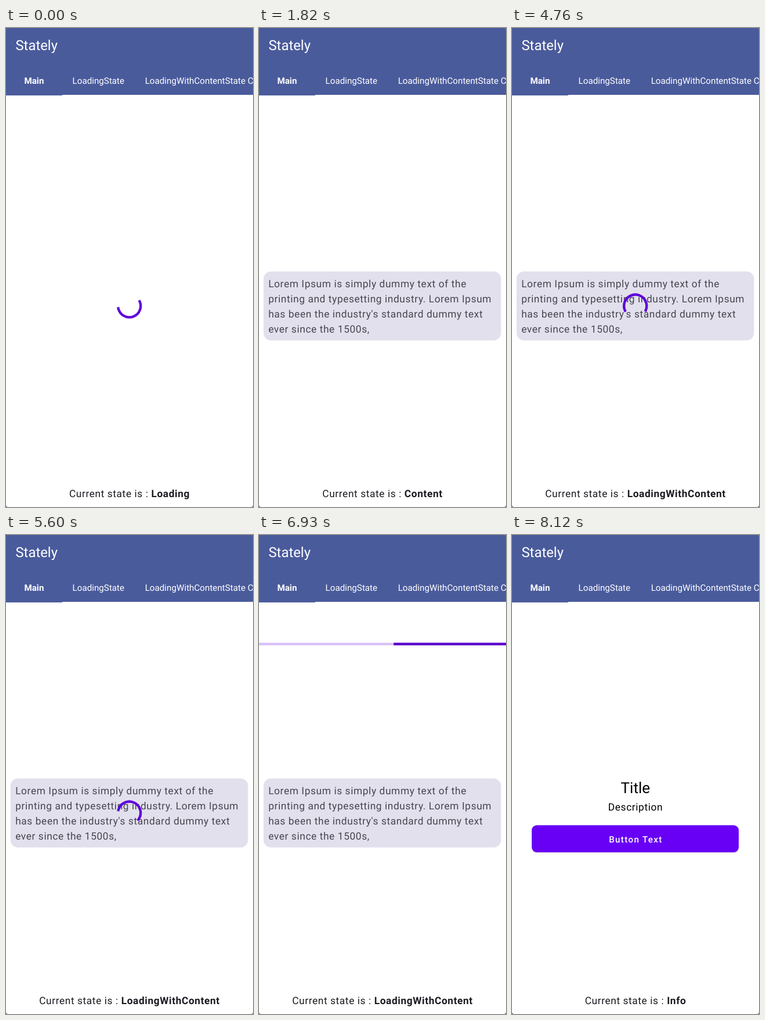
Animation, 426 px wide and 824 px high, one loop 9.1 s. Source, as an HTML page with a canvas:

```html
<!DOCTYPE html>
<html lang="en">
<head>
<meta charset="utf-8">
<title>Stately</title>
<style>
  html, body { margin: 0; width: 100%; height: 100%; overflow: hidden; background: #333; }
  svg, canvas { position: absolute; left: 0; top: 0; width: 426px; height: 824px; }
  text { font-family: Roboto, sans-serif; text-rendering: geometricPrecision; }
  .tab { font-size: 15.2px; fill: #fff; }
  .body { font-size: 17.37px; letter-spacing: .58px; }
  .mid { text-anchor: middle; }
  .bold { font-weight: 700; }
</style>
</head>
<body>
<svg viewBox="0 0 426 824">
  <clipPath id="screen"><rect width="426" height="824" rx="3.5"/></clipPath>
  <g clip-path="url(#screen)">
    <rect width="426" height="824" fill="#fff"/>
    <rect width="426" height="115" fill="#4a5b9c"/>
    <rect width="97" height="116" fill="#4a5b9c"/>
    <text x="16.4" y="38.3" font-size="23.9" fill="#fff">Stately</text>
    <text class="tab bold mid" x="48.4" y="96">Main</text>
    <text class="tab" x="114.6" y="96">LoadingState</text>
    <text class="tab" x="239.7" y="96">LoadingWithContentState Custom</text>

    <g id="content" class="body" fill="#45464f">
      <rect x="7.8" y="418.7" width="409.6" height="118.8" rx="13" fill="#e2e0ec"/>
      <text x="16.2" y="446">Lorem Ipsum is simply dummy text of the</text>
      <text x="16.2" y="472">printing and typesetting industry. Lorem Ipsum</text>
      <text x="16.2" y="498">has been the industry's standard dummy text</text>
      <text x="16.2" y="524">ever since the 1500s,</text>
    </g>

    <g id="info">
      <text class="mid" x="212.8" y="444" font-size="26" fill="#000">Title</text>
      <text class="mid body" x="213" y="474" fill="#000">Description</text>
      <rect x="34.3" y="500" width="357" height="46.8" rx="8.7" fill="#000" opacity=".15"/>
      <rect x="34" y="499.3" width="357" height="46.4" rx="8.7" fill="#6800f6"/>
      <text class="mid" x="213.4" y="528.6" font-size="15.17" font-weight="500" letter-spacing="1.355" fill="#fff">Button Text</text>
    </g>

    <text class="mid body" x="213" y="806.5" fill="#1a1b21">Current state is : <tspan id="state" class="bold">Loading</tspan></text>
  </g>
</svg>
<canvas id="stage" width="426" height="824"></canvas>
<script>
const LOOP = 9100, TICK = 70, REAL_TICK = 200 / 3;
const CONTENT_AT = 1820, SPIN_AT = 3920, BAR_AT = 6020, INFO_AT = 8120;
const DP = 426 / 393;
const $ = id => document.getElementById(id);
const ctx = $('stage').getContext('2d');
const clamp = x => Math.max(0, Math.min(1, x));

function bezier(x1, y1, x2, y2) {
  const at = (a, b, s) => 3 * a * (1 - s) ** 2 * s + 3 * b * (1 - s) * s * s + s ** 3;
  return x => {
    if (x <= 0 || x >= 1) return clamp(x);
    let lo = 0, hi = 1;
    for (let i = 0; i < 24; i++) {
      const m = (lo + hi) / 2;
      if (at(x1, x2, m) < x) lo = m; else hi = m;
    }
    return at(y1, y2, lo);
  };
}

const arcEase = bezier(.4, 0, .2, 1);
const head1 = bezier(.2, 0, .8, 1), tail1 = bezier(.4, 0, 1, 1);
const head2 = bezier(0, 0, .65, 1), tail2 = bezier(.1, 0, .45, 1);

// Material indeterminate circle
function drawSpinner(ms) {
  const turn = 1332, half = turn / 2, t = ms % turn;
  const rotation = Math.floor(ms / turn) * 216 + 286 * t / turn - 90;
  const end = 290 * arcEase(clamp(t / half));
  const start = 290 * arcEase(clamp((t - half) / half));
  const from = (rotation + start + 5.73) * Math.PI / 180;
  const sweep = Math.max(end - start, .1) * Math.PI / 180;
  ctx.beginPath();
  ctx.arc(212.7, 478.1, 18 * DP, from, from + sweep);
  ctx.lineWidth = 4 * DP;
  ctx.lineCap = 'square';
  ctx.strokeStyle = '#5f00dc';
  ctx.stroke();
}

// Material indeterminate line
function drawBar(ms) {
  const t = ms % 1800, y = 185.4, h = 4 * DP;
  const part = (ease, delay, span) => 426 * ease(clamp((t - delay) / span));
  const line = (tail, head) => ctx.fillRect(tail, y, head - tail, h);
  ctx.fillStyle = '#d8c2f7';
  line(0, 426);
  ctx.fillStyle = '#5b00c8';
  line(part(tail1, 333, 850), part(head1, 0, 750));
  line(part(tail2, 1267, 533), part(head2, 1000, 567));
}

function stateAt(t) {
  if (t < CONTENT_AT) return 'Loading';
  if (t < SPIN_AT) return 'Content';
  return t < INFO_AT ? 'LoadingWithContent' : 'Info';
}

function draw(now) {
  const t = Math.floor(now % LOOP / TICK) * TICK;
  const since = start => (t - start) / TICK * REAL_TICK;
  const state = stateAt(t);
  if ($('state').textContent !== state) $('state').textContent = state;
  $('content').style.display = /Content/.test(state) ? '' : 'none';
  $('info').style.display = state === 'Info' ? '' : 'none';

  ctx.clearRect(0, 0, 426, 824);
  if (state === 'Loading') drawSpinner(since(0) + 282);
  if (t >= SPIN_AT && t < BAR_AT) drawSpinner(since(SPIN_AT) + 27);
  if (t >= BAR_AT && t < INFO_AT) drawBar(since(BAR_AT) + 49);
}

const begin = performance.now();
function frame() {
  draw(performance.now() - begin);
  requestAnimationFrame(frame);
}
frame();
</script>
</body>
</html>
```
